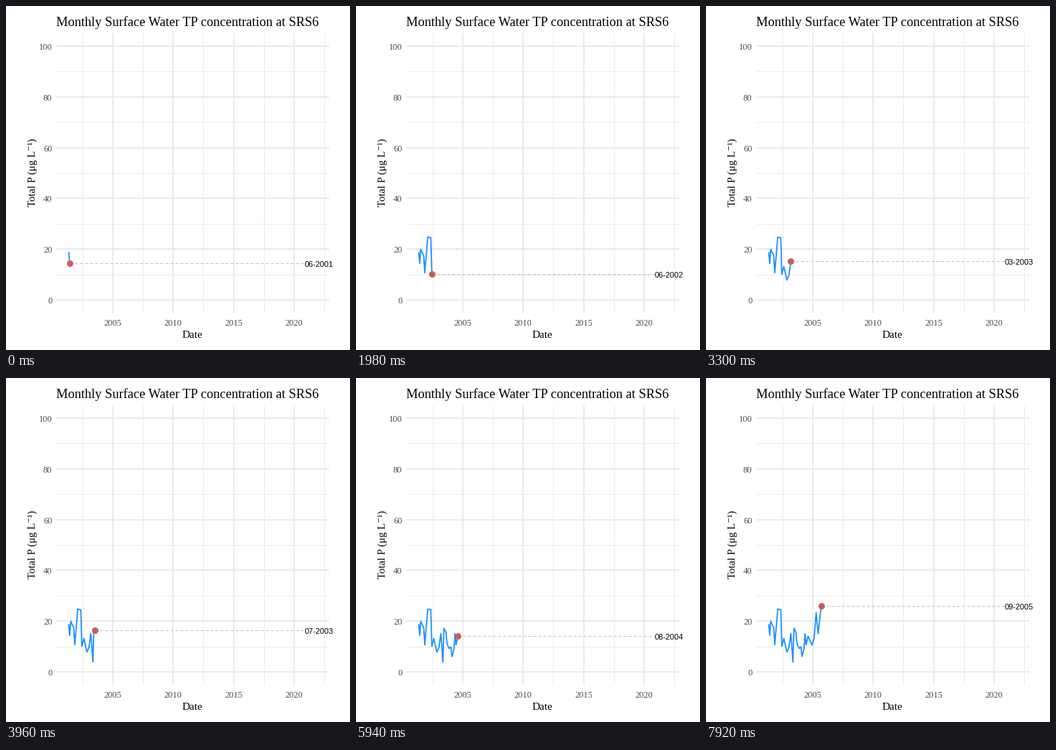
Animation, 480 px wide and 480 px high, one loop 8000 ms. Source, as a matplotlib script:

```python
import numpy as np
import matplotlib.pyplot as plt
from matplotlib.animation import FuncAnimation

SIZE, DPI = 480, 100
PX = 72 / DPI                      # points per pixel
LOOP, TICK, HOLD = 8000, 40, 330   # ms
PACE = 2.131                       # months revealed per step
YEAR = 16.89                       # pixels per year
SERIF = ["Liberation Serif", "DejaVu Serif"]
GAPS = {2, 10, 40}                 # months without a sample

# turning points of the series: months since June 2001, total phosphorus
TURNS = np.array([
    (-1, 18.9), (0, 14.4), (1, 20), (4, 17.4), (5, 10.7), (8, 24.8),
    (11, 24.5), (12, 10.1), (14, 13.2), (17, 7.9), (19, 9.6), (21, 15.2),
    (23, 3.9), (24, 17.2), (26, 15.6), (27, 11.3), (29, 9.3), (31, 9.9),
    (32, 6.1), (34, 9.1), (35, 15.1), (36, 10.7), (38, 14.1), (42, 10.6),
    (44, 13.2), (46, 23.4), (48, 15.1), (51, 25.9)])


def year_x(year):
    return 148.75 + YEAR * (year - 2005)


def month_x(month):
    return 88.9 + YEAR / 12 * month


def value_y(value):
    return 410.25 - 3.545 * value


fig = plt.figure(figsize=(SIZE / DPI, SIZE / DPI), dpi=DPI, facecolor="white")
ax = fig.add_axes([0, 0, 1, 1])
ax.set_xlim(0, SIZE)
ax.set_ylim(SIZE, 0)
ax.axis("off")


def stroke(xs, ys, color, width, **kw):
    return ax.plot(xs, ys, color=color, lw=width * PX,
                   solid_capstyle="butt", dash_capstyle="butt", **kw)[0]


def write(x, y, text, size, color="black", ha="left", family=SERIF, **kw):
    return ax.text(x, y, text, fontsize=size * PX, color=color, ha=ha,
                   va="baseline", family=family, **kw)


def grid(width, years, values):
    for year in years:
        stroke([year_x(year)] * 2, [38, 428], "#EBEBEB", width, zorder=1)
    for value in values:
        stroke([70, 451], [value_y(value)] * 2, "#EBEBEB", width, zorder=1)


years, values = range(2005, 2021, 5), range(0, 101, 20)
grid(1, np.arange(2002.5, 2023, 5), range(10, 100, 20))
grid(2, years, values)
for year in years:
    write(year_x(year), 446, str(year), 12.4, "#4D4D4D", "center")
for value in values:
    write(64.5, round(value_y(value) + 5), str(value), 12.4, "#4D4D4D", "right")

write(70, 28, "Monthly Surface Water TP concentration at SRS6", 18.33)
write(260, 463, "Date", 15.2, ha="center")
write(40.5, 232.8, "Total P (μg L⁻¹)", 14.8, ha="center",
      rotation=90, rotation_mode="anchor")

trace = stroke([], [], "#1E90FF", 1.8, zorder=3, snap=False)
guide = stroke([], [], "#BEBEBE", 1, zorder=4, dashes=(4, 3))
dot = stroke([], [], "#CD5C5C", 1, zorder=5, marker="o",
             markersize=9 * PX, markeredgewidth=0)
label = write(416.8, 0, "", 11, family="Liberation Sans", zorder=6)


def draw(frame):
    step = ((frame + 1) * TICK - 1) // HOLD
    now = int(PACE * step)
    now -= now in GAPS
    months, levels = TURNS.T
    level = np.interp(now, months, levels)
    past = months < now
    x, y = month_x(now), value_y(level)
    trace.set_data(month_x(np.append(months[past], now)),
                   value_y(np.append(levels[past], level)))
    guide.set_data([x, 417], [y, y])
    dot.set_data([x], [y])
    year, month = divmod(now + 5, 12)
    label.set_text(f"{month + 1:02d}-{2001 + year}")
    label.set_y(round(y + 5))
    return trace, guide, dot, label


anim = FuncAnimation(fig, draw, frames=LOOP // TICK, interval=TICK,
                     repeat=True, repeat_delay=0, blit=False)
plt.show()
```
